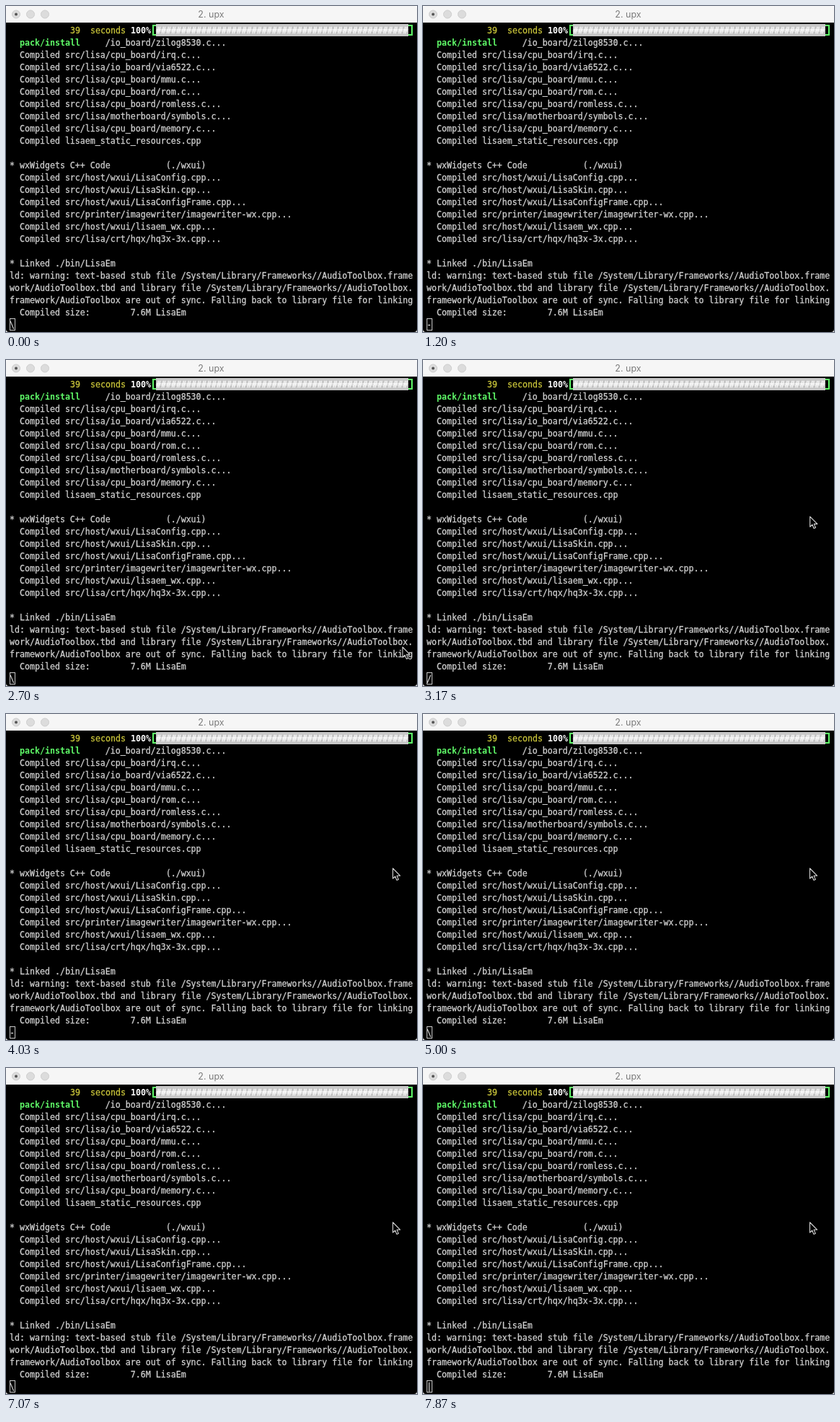
Animation, 570 px wide and 452 px high, one loop 8000 ms. Source, as an HTML page:

```html
<!DOCTYPE html>
<html lang="en">
<head>
<meta charset="utf-8">
<title>Terminal</title>
<style>
  html, body { margin: 0; width: 570px; height: 452px; overflow: hidden; background: #fff; }
  svg { display: block; }
  .term text {
    font: 11.628px "DejaVu Sans Mono", monospace; white-space: pre;
    fill: currentColor; stroke: currentColor; stroke-width: .3; color: #cfcfcf;
  }
  .term .bold { font-weight: bold; stroke: none; }
  .title { font: 12.5px Inter, sans-serif; fill: #7c7c7c; text-anchor: middle; }
</style>
</head>
<body>
<svg width="570" height="452" viewBox="0 0 570 452">
  <path d="M0 452V5Q0 0 5 0H565Q570 0 570 5V452Z" fill="#f6f6f6"/>
  <g fill="#dcdcdc" stroke="#cecece">
    <circle cx="14" cy="11.5" r="5.5"/>
    <circle cx="34" cy="11.5" r="5.5"/>
    <circle cx="54" cy="11.5" r="5.5"/>
  </g>
  <circle cx="14" cy="11.5" r="2" fill="#555"/>
  <text class="title" x="284.5" y="16">2. upx</text>
  <path d="M0 23H570V448Q570 452 566 452H4Q0 452 0 448Z" fill="#000"/>
  <g class="term" id="term">
    <rect x="208" y="25" width="350" height="17" fill="#c7c7c7"/>
    <path d="M208 27H204V40H208M558 27H563V40H558" fill="none" stroke="#5ffa68" stroke-width="2"/>
    <rect x="5.5" y="433.5" width="7" height="16" fill="none" stroke="#c7c7c7"/>
  </g>
  <path id="pointer" d="M0 0V14.2L3.2 11.2L5.4 16.4L7.8 15.4L5.6 10.3H10.2Z" fill="#000" stroke="#d8d8d8" stroke-width="1.1" stroke-linejoin="round"/>
</svg>
<script>
const LOOP = 8000, FPS = 30, COL = 7, ROW = 17;
const term = document.getElementById("term");
const pointer = document.getElementById("pointer");

function put(row, col, str, color, bold) {
  const t = document.createElementNS("http://www.w3.org/2000/svg", "text");
  t.setAttribute("x", 5 + col * COL);
  t.setAttribute("y", 38 + row * ROW);
  if (color) t.style.color = color;
  if (bold) t.setAttribute("class", "bold");
  t.textContent = str;
  return term.appendChild(t);
}

put(0, 12, "39  seconds", "#c9c43a");
put(0, 24, "100%", "#fff", true);
put(0, 29, "#".repeat(50), "#fff");
put(1, 2, "pack/install", "#5ffa68", true);

const LINES = `                   /io_board/zilog8530.c...
  Compiled src/lisa/cpu_board/irq.c...
  Compiled src/lisa/io_board/via6522.c...
  Compiled src/lisa/cpu_board/mmu.c...
  Compiled src/lisa/cpu_board/rom.c...
  Compiled src/lisa/cpu_board/romless.c...
  Compiled src/lisa/motherboard/symbols.c...
  Compiled src/lisa/cpu_board/memory.c...
  Compiled lisaem_static_resources.cpp

* wxWidgets C++ Code           (./wxui)
  Compiled src/host/wxui/LisaConfig.cpp...
  Compiled src/host/wxui/LisaSkin.cpp...
  Compiled src/host/wxui/LisaConfigFrame.cpp...
  Compiled src/printer/imagewriter/imagewriter-wx.cpp...
  Compiled src/host/wxui/lisaem_wx.cpp...
  Compiled src/lisa/crt/hqx/hq3x-3x.cpp...

* Linked ./bin/LisaEm
ld: warning: text-based stub file /System/Library/Frameworks//AudioToolbox.frame
work/AudioToolbox.tbd and library file /System/Library/Frameworks//AudioToolbox.
framework/AudioToolbox are out of sync. Falling back to library file for linking
  Compiled size:        7.6M LisaEm`;
LINES.split("\n").forEach((s, i) => put(1 + i, 0, s));

// The backslash lasts two beats, the other signs one
const SPIN = "\\\\|/-", TURN = 697;
const spinner = put(24, 0, SPIN[0]);

// Each glide: start, end, x and y reached
const REST = { x: 541, y: 454 };
const GLIDES = [
  [1900, 2130, 536.5, 414.5],
  [2130, 2700, 550, 398],
  [2970, 3170, 536.5, 214]
];

function pointerAt(t) {
  return GLIDES.reduce((p, [from, to, x, y]) => {
    const u = Math.min(1, Math.max(0, (t - from) / (to - from)));
    return { x: p.x + (x - p.x) * u, y: p.y + (y - p.y) * u };
  }, REST);
}

function draw(time) {
  const t = Math.floor((time + 4) * FPS / 1000) * 1000 / FPS;
  const turn = (t + 89) / TURN % 1;
  spinner.textContent = SPIN[Math.floor(turn * SPIN.length)];

  const p = pointerAt(t);
  pointer.style.display = t < GLIDES[0][0] ? "none" : "";
  pointer.setAttribute("transform", `translate(${p.x} ${p.y})`);
}

const start = performance.now();
function frame() {
  draw((performance.now() - start) % LOOP);
  requestAnimationFrame(frame);
}
frame();
</script>
</body>
</html>
```
